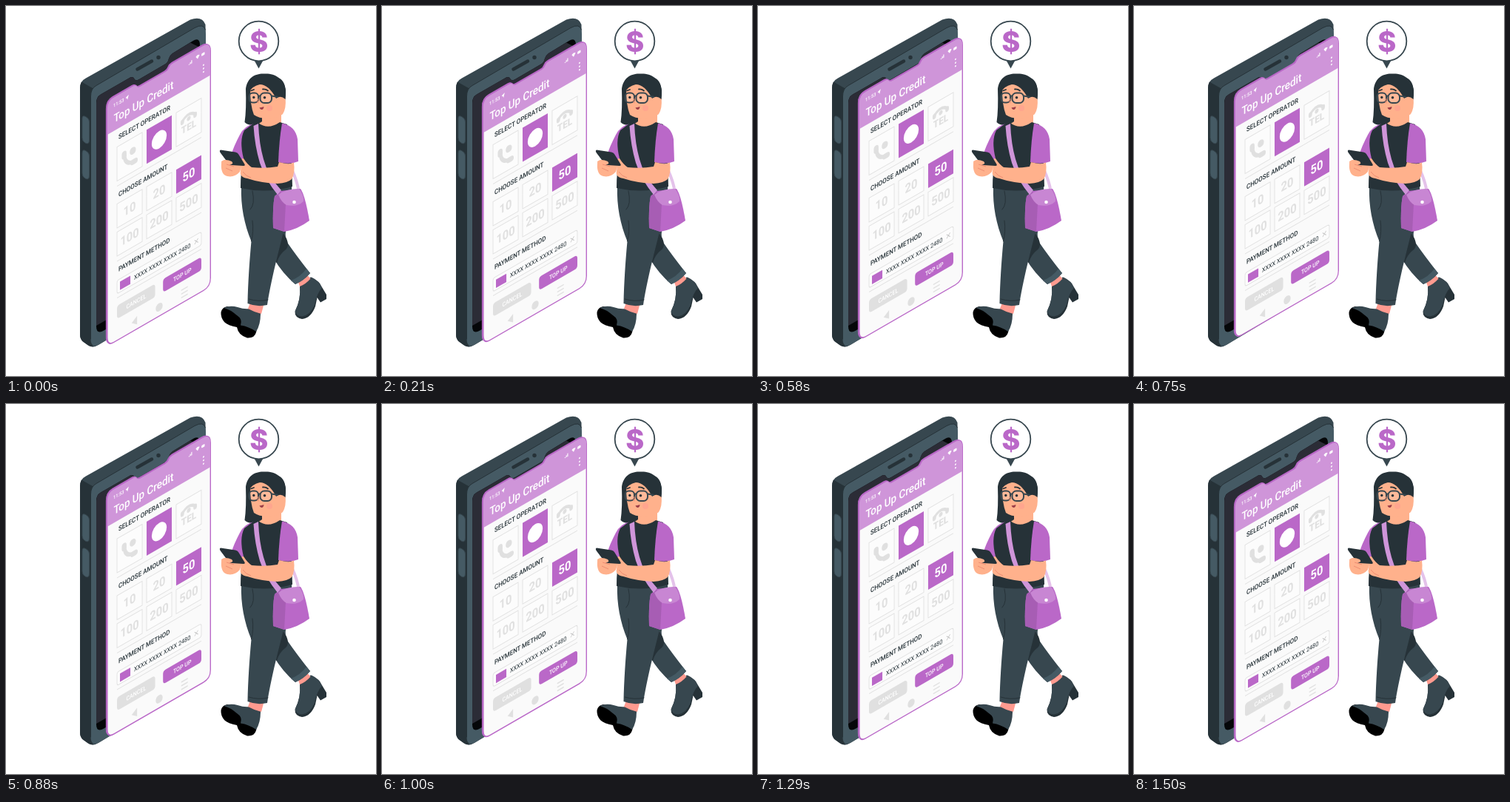
These frames come from a looping animation (500 by 500 pixels, 1.54 s). An HTML page:

```html
<!DOCTYPE html>
<html lang="en">
<head>
<meta charset="utf-8">
<title>Top Up Credit</title>
<style>
html, body { margin: 0; width: 100%; height: 100%; overflow: hidden; background: #fff; }
svg { display: block; width: 100vw; height: 100vh; }
text { font-family: Roboto, "Open Sans", sans-serif; font-weight: 500; }
.ink { fill: #263238; }
.slate { fill: #37474f; }
.steel { fill: #455a64; }
.skin { fill: #ffb18c; }
.sock { fill: #ff9a8f; }
.plum { fill: #ba68c8; }
.lilac { fill: #cf95d9; }
.line { fill: none; stroke: #263238; stroke-linecap: round; stroke-linejoin: round; }
</style>
</head>
<body>
<svg viewBox="0 0 500 500">
  <defs><clipPath id="cut"><path id="cutShape"/></clipPath></defs>

  <g id="phone">
    <path class="slate" d="M100 111Q100 101.500 108 97.500L249 18.500Q265 13 269.500 25L270 60V371L125 458Q117 463 111 458.500L104 453.500Q100 450 100 444Z"/>
    <path class="ink" d="M100 111Q100 106 102 102.500L117 111V460Q113 460 111 458.500L104 453.500Q100 450 100 444Z"/>
    <path class="steel" d="M114.500 122Q114.500 111.500 122 107.500L255 29.500Q270 22 270 38V371L126 457Q114.500 463 114.500 450Z"/>
    <path class="line" stroke-width="1" d="M114.500 450V122Q114.500 111.500 122 107.500L255 29.500Q267 23 269.500 32"/>
    <path d="M122 131Q122 123 128 119.500L168 96.500Q172 95 173 98Q175 102 180 99L216 78Q219 76 220 71Q221 67 225 64L252 47.500Q262 41 262 53V366L134 437.500Q122 445 122 433Z" fill="#050709"/>
    <path d="M122 131Q122 123 128 119.500L168 96.500Q172 95 173 98Q175 102 180 99L216 78Q219 76 220 71Q221 67 225 64L249 49.500L262 56V366L136 424L122 432Z" fill="#2b2c36"/>
    <path class="line" stroke-width="4.500" d="M177.500 85.500L197 74.500"/>
    <circle class="ink" cx="206" cy="69.500" r="2.700"/>
    <g class="steel" stroke="#37474f" stroke-width="1">
      <path d="M103 152Q103 147 107.500 149.500Q112.500 152 112.500 157V181Q112.500 188 107 185Q103 183 103 178Z"/>
      <path d="M103 199Q103 193 107.500 195.500Q112.500 198 112.500 203V229Q112.500 236 107 233Q103 231 103 226Z"/>
    </g>
  </g>

  <g id="panel"></g>

  <g id="bubble">
    <path class="slate" d="M335.500 73.500H347.500L341.500 84.500Z"/>
    <circle cx="341.500" cy="47.500" r="26.800" fill="#fff" stroke="#37474f" stroke-width="1.800"/>
    <text class="plum" x="341.800" y="61.500" font-size="38" style="font-family:Inter,sans-serif;font-weight:800" text-anchor="middle">$</text>
  </g>

  <g id="woman">
    <!-- back leg and boot -->
    <path class="ink" d="M397 378L412 366.500Q420 370 424 375L433 390V396L425 400.500L420.500 394L418 406Q412 422 400 423Q390 421 390.500 413Q399 396 397 378Z"/>
    <path class="slate" d="M397 378L412 366.500Q420 370 424 375L427 381Q420 388 417 404Q411 418 400 419.500Q391 419 390.700 412Q399 396 397 378Z"/>
    <path class="sock" d="M394 371L406 362L411.500 368.500Q405 376 397 379Z"/>
    <path class="slate" d="M352 300L380 292Q376 310 379 318Q392 337 411 361Q402 371 391 376Q374 362 361 340Z"/>
    <path class="ink" d="M372 304L378.500 313Q384 325 377 330Q369 336 366 347L360 340Z"/>
    <path class="steel" d="M385 371Q398 366 406 355L411 361Q403 371 391 376Z"/>

    <!-- front boot and leg -->
    <path d="M290.500 414Q292 407 299 406L344 415L338 441Q336 449 326 448.500Q314 445 312 434Q300 432 295 427Q290 421 290.500 414Z"/>
    <path class="slate" d="M294 408Q303 404 313 407Q322 410 329 409L344 415Q344 431 338 440Q328 433 317 431.500Q320 423 312 418Q303 410 294 408Z"/>
    <path class="sock" d="M330 401L349 401L345 416Q336 414 327 409Z"/>
    <path class="slate" d="M318 244L386 242Q388 264 378 292C372 320 360 360 353 404Q339 407 326.500 402C327 375 329 345 331.500 318C322 295 317 270 318 244Z"/>
    <path class="line" stroke-width="1" d="M331.500 318Q335 305 333 290M333 250Q337 268 330 275M328 396Q341 400 354 397"/>

    <!-- hair behind -->
    <path class="ink" d="M324 112C326 96 338 90.500 350 91.500C363 91 376 98 378 114L377 130L362 148L360 160L334 161Q326 161 322.500 157Q325 140 324 112Z"/>

    <!-- far arm -->
    <path class="skin" d="M304 203L321 207L316 224Q309 232 299 230Q290 228 291 213Q293 206 301 209Z"/>
    <path class="plum" d="M335 159Q322 162 316 174Q308 189 304 202Q312 209 321 209L333 185Z"/>

    <!-- torso -->
    <path class="skin" d="M346 148L372 144L372 160Q355 172 340 160L346 156Z"/>
    <path class="ink" d="M334 159L341 158Q354 168 370 157L380 160L386 212L387 244Q352 254 317 246Q317 222 321 206Q315 182 322 168Z"/>
    <path class="plum" d="M373 158.500Q391 162 394 180L395 210Q383 215 368 211Q369 182 373 158.500Z"/>

    <!-- bag -->
    <path fill="none" stroke="#e4c2ea" stroke-width="4" d="M387 223Q393 235 396 252"/>
    <path class="plum" d="M371 250L398 247Q404 255 410 290Q394 302 376 305L361 300Q360 272 363 257Z"/>
    <path d="M363 257L371 251L378 267L376 305L361 300Q360 272 363 257Z" fill="#a75db4"/>
    <path d="M368 255Q378 247 396 247Q403 256 402 264Q394 272 379 269Q372 265 368 255Z" fill="#c886d3"/>
    <circle cx="389.500" cy="265" r="2.300" fill="#fff"/>
    <path class="lilac" d="M334.500 162L341 159Q342 186 348 207Q354 230 372 249L367 255Q351 236 343 212Q336 188 334.500 162Z"/>

    <!-- near arm with phone -->
    <path class="skin" d="M369 211Q382 215 389 211.500Q391 226 386 234Q381 239 367 240Q344 239 326 233Q315 231 317 223L318 213Q317 205 321 206Q326 214 332 218Q351 220 367 217Z"/>
    <path class="ink" d="M290 194.500Q288 195 289.500 198L300 212Q302 215 305 215L321 216Q324 216 322 213L314 200Q313 198 310 197.500Z"/>
    <path class="skin" d="M291 210Q296 206 305 210Q308 213 304 214L299 214L309 217Q313 221 307 222L298 219L308 224Q311 228 305 229Q295 228 292 219Z"/>
    <path fill="none" stroke="#e9856d" stroke-width=".8" d="M298 214L308 217M297 219L306 223M320 224Q324 230 331 232"/>

    <!-- face -->
    <path class="skin" d="M330 111Q340 104 352 103Q361 110 365 122Q372 118 377.500 124Q379 138 374 146Q368 151 362 151Q345 154 335 147Q330 135 330 111Z"/>
    <path class="ink" d="M328 117Q333 108 343 106Q355 106 365 125Q371 120 377.500 126Q380 104 370 98L352 94Q332 95 328 117Z"/>
    <circle cx="356" cy="138" r="4" fill="#ff9a8f" opacity=".5"/>
    <g fill="#fff" fill-opacity=".12" stroke="#37474f" stroke-width="2">
      <rect x="328.500" y="117.500" width="12.500" height="13" rx="5"/>
      <rect x="343.500" y="117.500" width="15.500" height="13.500" rx="5.500"/>
      <path fill="none" d="M341 122Q342 121 343.500 122M359 121.500L368 123"/>
    </g>
    <circle class="ink" cx="334.800" cy="123.500" r="1.700"/>
    <circle class="ink" cx="349.500" cy="123.800" r="1.800"/>
    <path class="line" stroke-width="1.800" d="M331 114.500L335 113M347 112.500Q351 112 354 114.500"/>
    <path fill="none" stroke="#e9856d" stroke-width="1" d="M341.500 125Q338 130 341.500 131"/>
    <path d="M342.500 137Q345 137.500 348.500 136Q348 140.500 345 140Q343 139.500 342.500 137Z" fill="#9c3f48"/>
  </g>
</svg>

<script>
const LOOP = 1540, FLOAT = 1500, RISE = 10, FPS = 24;
const PURPLE = '#ba68c8', GREY = '#e0e0e0', INK = '#263238', WHITE = '#fff';
const panel = document.getElementById('panel');

// Panel coordinates lie in the isometric plane of the screen.
const label = (x, y, size, fill, str, anchor = 'start', weight = 500) =>
  `<text x="${x}" y="${y}" font-size="${size}" fill="${fill}" text-anchor="${anchor}" style="font-weight:${weight}">${str}</text>`;
const box = (x, y, w, h, fill, stroke = 'none', r = 0) =>
  `<rect x="${x}" y="${y}" width="${w}" height="${h}" rx="${r}" fill="${fill}" stroke="${stroke}"/>`;
const dot = (x, y, r, fill) => `<circle cx="${x}" cy="${y}" r="${r}" fill="${fill}"/>`;
const rule = y => `<path d="M16.200 ${y}H147.800" stroke="${GREY}"/>`;
const stroke = (d, color, w) =>
  `<path d="${d}" fill="none" stroke="${color}" stroke-width="${w}" stroke-linecap="round"/>`;

const LEFT = 16.2, PITCH = 46.15, CELL = 39.3;
const col = i => LEFT + i * PITCH;
const cell = (i, y, h, on) =>
  box(col(i), y, CELL, h, on ? PURPLE : '#fcfcfc', on ? 'none' : GREY);

function amounts() {
  return [10, 20, 50, 100, 200, 500].map((n, k) => {
    const i = k % 3, y = k < 3 ? 275.5 : 313.5, on = n === 50;
    return cell(i, y, 32.5, on) +
      label(col(i) + CELL / 2, y + 22.2, 17, on ? WHITE : GREY, n, 'middle', 700);
  }).join('');
}

function operators() {
  const a = col(0) + CELL / 2, b = col(1) + CELL / 2, c = col(2) + CELL / 2;
  return [0, 1, 2].map(i => cell(i, 198.5, 46, i === 1)).join('') +
    stroke(`M${a - 8} 215Q${a - 8} 230 ${a + 7} 231.500`, GREY, 5) +
    stroke(`M${a - 8.5} 213.500V217M${a + 5} 231.500H${a + 9}`, GREY, 7.5) +
    dot(a + 5, 216, 4.8, GREY) +
    dot(b, 221.7, 11.7, WHITE) +
    stroke(`M${c - 10} 215Q${c} 206 ${c + 10} 215`, GREY, 4) +
    stroke(`M${c - 10} 215V217M${c + 10} 215V217`, GREY, 5.5) +
    dot(c, 216, 3, GREY) +
    label(c, 232, 13.5, GREY, 'TEL', 'middle', 900);
}

function statusBar() {
  const bars = [0, 1, 2].map(i => box(128 + i * 2, 143 - i * 1.7, 1.3, 1 + i * 1.7, WHITE)).join('');
  return label(10.5, 142.5, 6.6, WHITE, '11:53') +
    `<path d="M29.500 139L34.500 137L32.500 143L31.500 140.500Z" fill="${WHITE}"/>` + bars +
    `<path d="M139 138.500Q142 136 145 138.500L142 142.500Z" fill="${WHITE}"/>` +
    box(148, 138.5, 5, 3.5, WHITE, 'none', 1) +
    [155.3, 160, 164.6].map(y => dot(151.2, y, 1.1, WHITE)).join('');
}

function buildPanel() {
  const shape = 'M1 140Q1 129 11 129H41q4 0 5.500 2.500q2 3.500 6 3.500H92q4 0 5.500-3q1.500-3 6-3H149' +
    'Q162 129 162 142V449Q162 460 151 460H11Q1 460 1 449Z';
  document.getElementById('cutShape').setAttribute('d', shape);
  panel.innerHTML =
    `<path d="${shape}" fill="${PURPLE}" stroke="${PURPLE}" transform="translate(-1.800 -1.800)"/>` +
    `<path d="${shape}" fill="#fafafa" stroke="${PURPLE}" stroke-width="1.600"/>` +
    `<rect x="-2" y="120" width="166" height="54.500" fill="#cf95d9" clip-path="url(#cut)"/>` +
    statusBar() +
    label(11, 163.5, 15.5, WHITE, 'Top Up Credit') +
    label(18.5, 189.6, 9.2, INK, 'SELECT OPERATOR') + operators() + rule(251.5) +
    label(18.5, 267.2, 9.2, INK, 'CHOOSE AMOUNT') + amounts() + rule(353) +
    label(18.5, 368.3, 9.1, INK, 'PAYMENT METHOD') +
    box(LEFT, 379, 131.6, 18, '#fcfcfc', GREY, 3) +
    box(20.8, 383, 16.2, 11.2, PURPLE) +
    label(42.7, 391.5, 8.4, INK, 'XXXX XXXX XXXX 2480', 'start', 400) +
    stroke('M137.500 385.500l5 5m0-5l-5 5', '#c4c4c4', 0.9) + rule(402.5) +
    box(LEFT, 413, 59.5, 18, GREY, 'none', 4) + label(46, 425, 8.2, WHITE, 'CANCEL', 'middle') +
    box(88, 413, 59.8, 18, PURPLE, 'none', 4) + label(118, 425, 8.2, WHITE, 'TOP UP', 'middle') +
    `<path d="M39 448L47.500 442.500V454Z" fill="${GREY}"/>` +
    dot(82, 448, 5.4, GREY) +
    stroke('M117 442.500h9m-9 5h9m-9 5h9', GREY, 1.6);
}

// Steady rise and fall, advanced in 24 steps a second.
function draw(ms) {
  const step = Math.floor((ms % LOOP + 4) * FPS / 1000);
  const p = (step / FPS * 1000 % FLOAT) / FLOAT;
  const lift = RISE * (1 - Math.abs(1 - 2 * p));
  panel.setAttribute('transform', `matrix(.866 -.5 0 1 136 ${-lift})`);
}

buildPanel();
const start = performance.now();
function tick() {
  draw(performance.now() - start);
  requestAnimationFrame(tick);
}
tick();
</script>
</body>
</html>
```
